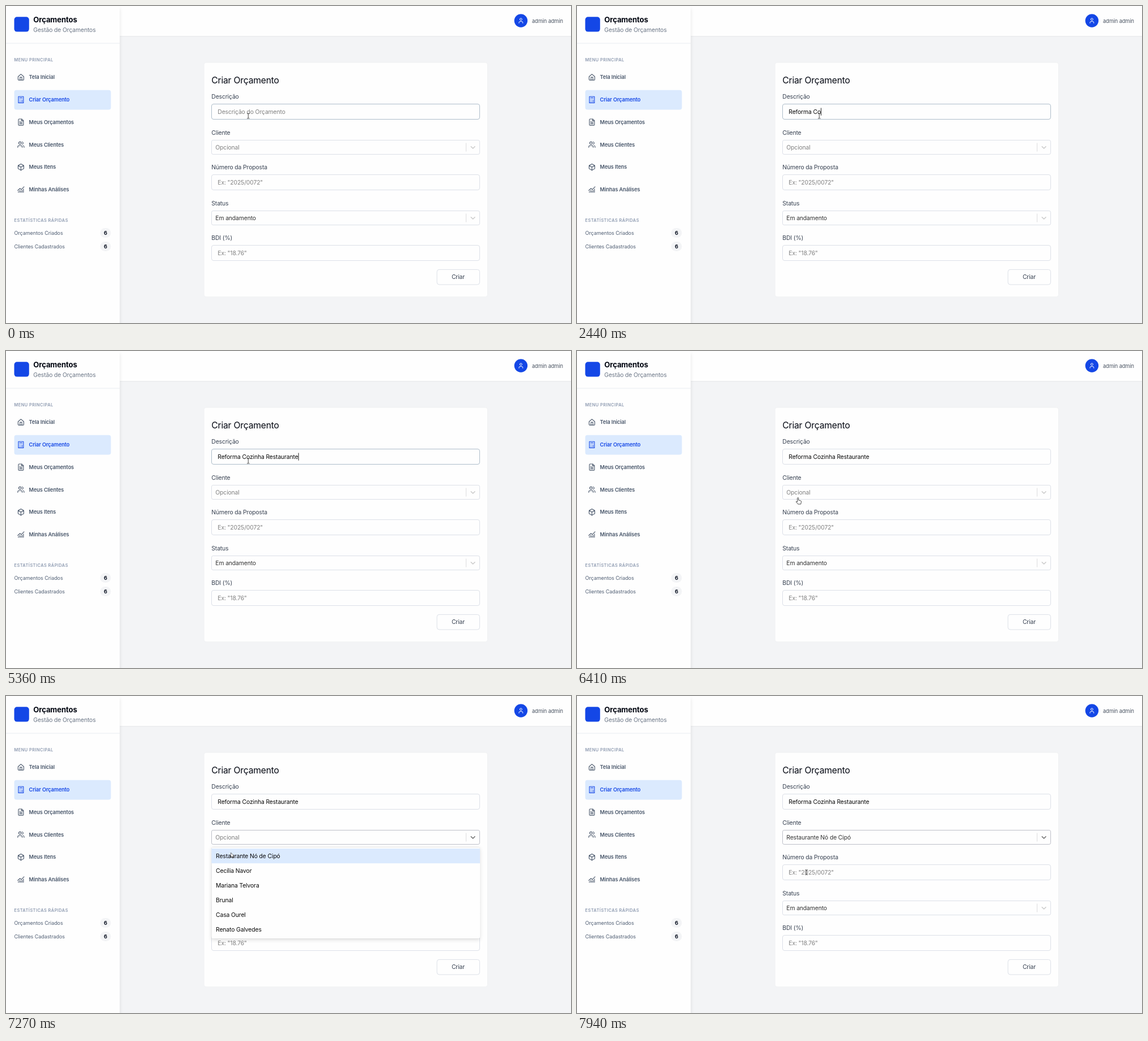
Recreate the animation shown at these times as an HTML page. Size 999x561 px, loop 8000 ms.

```html
<!DOCTYPE html>
<html lang="pt-BR">
<head>
<meta charset="utf-8">
<title>Criar Orçamento</title>
<style>
  html, body { margin: 0; width: 100%; height: 100%; overflow: hidden; background: #f3f4f6; }
  svg { display: block; }
  text { font-family: Inter, "Open Sans", sans-serif; font-size: 10.4px; letter-spacing: -.013em; white-space: pre; }
  .title { font-size: 15.7px; }
  .brand { font-size: 13.2px; font-weight: 700; }
  .section { font-size: 7.4px; font-weight: 600; letter-spacing: .46px; fill: #8d9ab0; }
  .nav { font-size: 9.2px; font-weight: 600; }
  .small { font-size: 9.1px; }
  .user { font-size: 9.3px; }
  .count { font-size: 9.2px; font-weight: 700; text-anchor: middle; }
  .button { text-anchor: middle; }
  .icon { fill: none; stroke-width: 2; stroke-linecap: round; stroke-linejoin: round; }
  .cardShadow { filter: drop-shadow(0 0 1px rgba(0, 0, 0, .03)); }
  .sideShadow { filter: drop-shadow(0 5px 3px rgba(0, 0, 0, .1)); }
  .headShadow { filter: drop-shadow(0 .7px .8px rgba(0, 0, 0, .12)); }
  .menuShadow { filter: drop-shadow(0 0 .6px rgba(0, 0, 0, .3)) drop-shadow(0 2.7px 3px rgba(0, 0, 0, .13)); }
</style>
</head>
<body>
<svg id="stage" xmlns="http://www.w3.org/2000/svg" width="999" height="561" viewBox="0 0 999 561"></svg>
<script>
const LOOP = 8000;
const BLINK = 530;
const BLUE = '#1447e6', PALE = '#dbeafe', PRESSED = '#b2d4ff';
const SLATE = '#475569', BORDER = '#dce0e8', HINT = '#808080', WHITE = '#fefefe';
const DESCRIPTION = 'Reforma Cozinha Restaurante';
const CLIENTS = ['Restaurante Nó de Cipó', 'Cecília Navor', 'Mariana Telvora', 'Brunal', 'Casa Ourel', 'Renato Galvedes'];
const KEY_TIMES = [240, 530, 990, 1085, 1180, 1320, 1380, 1580, 2260, 2440, 2640, 2770, 2910, 2980,
  3210, 3480, 3900, 4150, 4280, 4550, 4610, 4810, 4920, 5040, 5150, 5300, 5360];
const OPEN = 6610, PRESS = 7340, CHOOSE = 7540;

const stage = document.getElementById('stage');

function add(tag, attrs, parent = stage) {
  const node = document.createElementNS('http://www.w3.org/2000/svg', tag);
  for (const key in attrs) node.setAttribute(key, attrs[key]);
  parent.append(node);
  return node;
}
const group = (attrs = {}, parent) => add('g', attrs, parent);

function label(x, y, content, fill, cls = '', parent) {
  const node = add('text', { x, y, fill, class: cls, 'xml:space': 'preserve' }, parent);
  node.textContent = content;
  return node;
}

function box(x, y, width, height, rx, fill, stroke = 'none', parent) {
  return add('rect', { x, y, width, height, rx, fill, stroke }, parent);
}

function icon(cx, cy, size, stroke, d) {
  const k = size / 24;
  add('path', { class: 'icon', d, stroke, transform: `translate(${cx - size / 2} ${cy - size / 2}) scale(${k})` });
}

const ring = (x, y, r) => `M${x - r} ${y}a${r} ${r} 0 1 0 ${2 * r} 0a${r} ${r} 0 1 0 ${-2 * r} 0`;
const dots = (xs, ys) => ys.map(y => xs.map(x => `M${x} ${y}h.01`).join('')).join('');

function drawHeader() {
  box(201, -5, 805, 58, 0, WHITE).setAttribute('class', 'headShadow');
  box(-10, 0, 211, 570, 0, WHITE).setAttribute('class', 'sideShadow');
  box(0, 65.6, 201, .8, 0, '#e2e6ec');
  box(14.5, 19.3, 26.3, 26.3, 5, BLUE);
  label(48.3, 28.8, 'Orçamentos', '#030712', 'brand');
  label(48.3, 46, 'Gestão de Orçamentos', '#6b7686');
  add('circle', { cx: 910.4, cy: 26, r: 11.7, fill: BLUE });
  icon(910.4, 26, 11.5, '#fff', 'M19 21v-2a4 4 0 0 0-4-4H9a4 4 0 0 0-4 4v2' + ring(12, 7, 4));
  label(930, 29.8, 'admin admin', '#4b5563', 'user');
}

function drawSidebar() {
  label(14.5, 98, 'MENU PRINCIPAL', null, 'section');
  box(14.5, 148.8, 171, 34.7, 4, PALE);
  const items = [
    ['Tela Inicial', 'M15 21v-9H9v9M3 10l9-8 9 8v9a2 2 0 0 1-2 2H5a2 2 0 0 1-2-2z'],
    ['Criar Orçamento', 'M4 2H20V22H4ZM8 6h8M16 14v4' + dots([8, 12, 16], [10]) + dots([8, 12], [14, 18])],
    ['Meus Orçamentos', 'M15 2H6a2 2 0 0 0-2 2v16a2 2 0 0 0 2 2h12a2 2 0 0 0 2-2V7ZM14 2v6h6M10 9H8M16 13H8M16 17H8'],
    ['Meus Clientes', ring(9, 7, 4) + 'M16 21v-2a4 4 0 0 0-4-4H6a4 4 0 0 0-4 4v2M22 21v-2a4 4 0 0 0-3-3.9M16 3.1a4 4 0 0 1 0 7.8'],
    ['Meus Itens', 'M12 2L21 7V17L12 22L3 17V7ZM3 7l9 5 9-5M12 22V12'],
    ['Minhas Análises', 'M22 3L13 12 9 8 2 15M4 18v3M8 14v7M12 16v5M16 14v7M20 10v11'],
  ];
  items.forEach(([name, path], i) => {
    const y = 126.1 + i * 39.75, color = i === 1 ? BLUE : SLATE;
    icon(26.4, y, 13.3, color, path);
    label(40.6, y + 3.3, name, color, 'nav');
  });
  label(14.5, 382, 'ESTATÍSTICAS RÁPIDAS', null, 'section');
  ['Orçamentos Criados', 'Clientes Cadastrados'].forEach((name, i) => {
    const y = 401.5 + i * 24;
    label(14.5, y + 3.3, name, '#526075', 'small');
    box(166.5, y - 8.5, 19, 17, 8.5, '#f3f4f6');
    label(176, y + 3.3, '6', '#111827', 'count');
  });
}

function field(y, name, hint) {
  label(363.3, y - 9.6, name, '#374151');
  return {
    frame: box(363.5, y, 474, 27, 3.5, WHITE, BORDER),
    text: label(374.3, y + 17.5, hint, HINT),
  };
}

function select(y, name, value, fill) {
  label(363.3, y - 9.5, name, '#374151');
  const frame = box(363.5, y, 474, 25, 2.7, WHITE, BORDER);
  box(813, y + 5, .8, 15, 0, '#d4d4d8');
  const chevron = add('path', { d: `M822.2 ${y + 11.2}l3.4 3.3 3.4-3.3`, class: 'icon', stroke: '#c8c8c8', style: 'stroke-width:1.4' });
  return { frame, chevron, text: label(370.3, y + 16.2, value, fill) };
}

function drawMenu() {
  const menu = group();
  box(363.3, 267.4, 474.7, 162, 2.7, WHITE, 'none', menu).setAttribute('class', 'menuShadow');
  const active = box(363.3, 270, 474.7, 26.1, 0, PALE, 'none', menu);
  CLIENTS.forEach((name, i) => label(371, 286.9 + i * 26.05, name, '#0a0a0a', '', menu));
  return { menu, active };
}

function drawPointers() {
  const pointer = group();
  const shape = (d, stroke, fill, width) => add('path', { d, stroke, fill, 'stroke-width': width, 'stroke-linejoin': 'round' }, pointer);
  return {
    pointer,
    beam: shape('M-2.2-4.3H-.6L0-3.8.6-4.3H2.2M0-3.8V3.8M-2.2 4.3H-.6L0 3.8.6 4.3H2.2', '#333', 'none', .9),
    hand: shape('M-1 1Q0-.6 1 1V5L5 6Q6 6.3 5.8 8L5 12H0L-3.4 7.8Q-3.2 6.4-1 8Z', '#222', '#fff', .8),
    arrow: shape('M0 0V8.2L1.9 6.4 3.2 9.2 4.4 8.6 3.2 5.9H5.8Z', '#333', '#fff', .7),
  };
}

drawHeader();
drawSidebar();
box(350.5, 100.5, 500.5, 413.7, 4, WHITE).setAttribute('class', 'cardShadow');
label(363.3, 137.4, 'Criar Orçamento', '#030712', 'title');
const description = field(173.5, 'Descrição', 'Descrição do Orçamento');
const client = select(237.5, 'Cliente', 'Opcional', HINT);
field(298.5, 'Número da Proposta', 'Ex: "2025/0072"');
select(362.5, 'Status', 'Em andamento', '#333');
field(423.5, 'BDI (%)', 'Ex: "18.76"');
box(762, 466.4, 75.5, 26.6, 4, WHITE, BORDER);
label(799.5, 483.4, 'Criar', '#374151', 'button');
const { menu, active } = drawMenu();
const caret = box(0, 0, .9, 13.4, 0, '#111');
const glow = add('circle', { r: 8.2, fill: '#f2ee1c', opacity: .64 });
const { pointer, beam, hand, arrow } = drawPointers();

const show = (node, on) => node.setAttribute('display', on ? 'inline' : 'none');
const mix = (a, b, k) => a + (b - a) * k;

// Stepped pointer moves: start, interval, step count, from, to
const MOVES = [
  { start: 5900, every: 85, steps: 7, from: [428.3, 194.6], to: [390.7, 259] },
  { start: 7010, every: 66, steps: 5, from: [390.7, 259], to: [398.4, 279.4] },
  { start: 7740, every: 66, steps: 4, from: [398.4, 279.4], to: [405.6, 312] },
];

function pointerAt(t) {
  const move = MOVES.filter(m => t >= m.start).pop();
  if (!move) return MOVES[0].from;
  const k = Math.min(1, (Math.floor((t - move.start) / move.every) + 1) / move.steps);
  const eased = k * k * (3 - 2 * k);
  return move.from.map((v, i) => mix(v, move.to[i], eased));
}

function render(t) {
  const typed = KEY_TIMES.filter(k => k <= t).length;
  const open = t >= OPEN && t < CHOOSE, chosen = t >= CHOOSE;
  const [x, y] = pointerAt(t);

  description.text.textContent = typed ? DESCRIPTION.slice(0, typed) : 'Descrição do Orçamento';
  description.text.setAttribute('fill', typed ? '#0a0a0a' : HINT);
  description.frame.setAttribute('stroke', y < 201 ? '#aebdca' : BORDER);

  const typing = typed > 0 && t < OPEN && t - KEY_TIMES[typed - 1] < BLINK;
  const selecting = open && t - OPEN < BLINK;
  show(caret, typing || selecting);
  caret.setAttribute('x', typing ? 374.4 + description.text.getComputedTextLength() : 370.2);
  caret.setAttribute('y', typing ? 180.4 : 243.3);

  client.text.textContent = chosen ? CLIENTS[0] : 'Opcional';
  client.text.setAttribute('fill', chosen ? '#333' : HINT);
  client.frame.setAttribute('stroke', t >= OPEN && y > 262.5 ? '#bdbfc8' : BORDER);
  client.chevron.setAttribute('stroke', t >= OPEN ? '#666' : '#c8c8c8');

  show(menu, open);
  active.setAttribute('fill', t >= PRESS ? PRESSED : PALE);
  show(glow, (open && t < 6820) || (t >= PRESS && t < CHOOSE));
  glow.setAttribute('cx', x - .8);
  glow.setAttribute('cy', y + 1.2);

  const overField = y < 201 || y > 299;
  const overSelect = y >= 237.5 && y <= 262.5;
  show(beam, overField);
  show(hand, overSelect);
  show(arrow, !overField && !overSelect);
  pointer.setAttribute('transform', `translate(${x} ${y})`);
}

const began = performance.now();
function tick() {
  render((performance.now() - began) % LOOP);
  requestAnimationFrame(tick);
}
tick();
</script>
</body>
</html>
```
